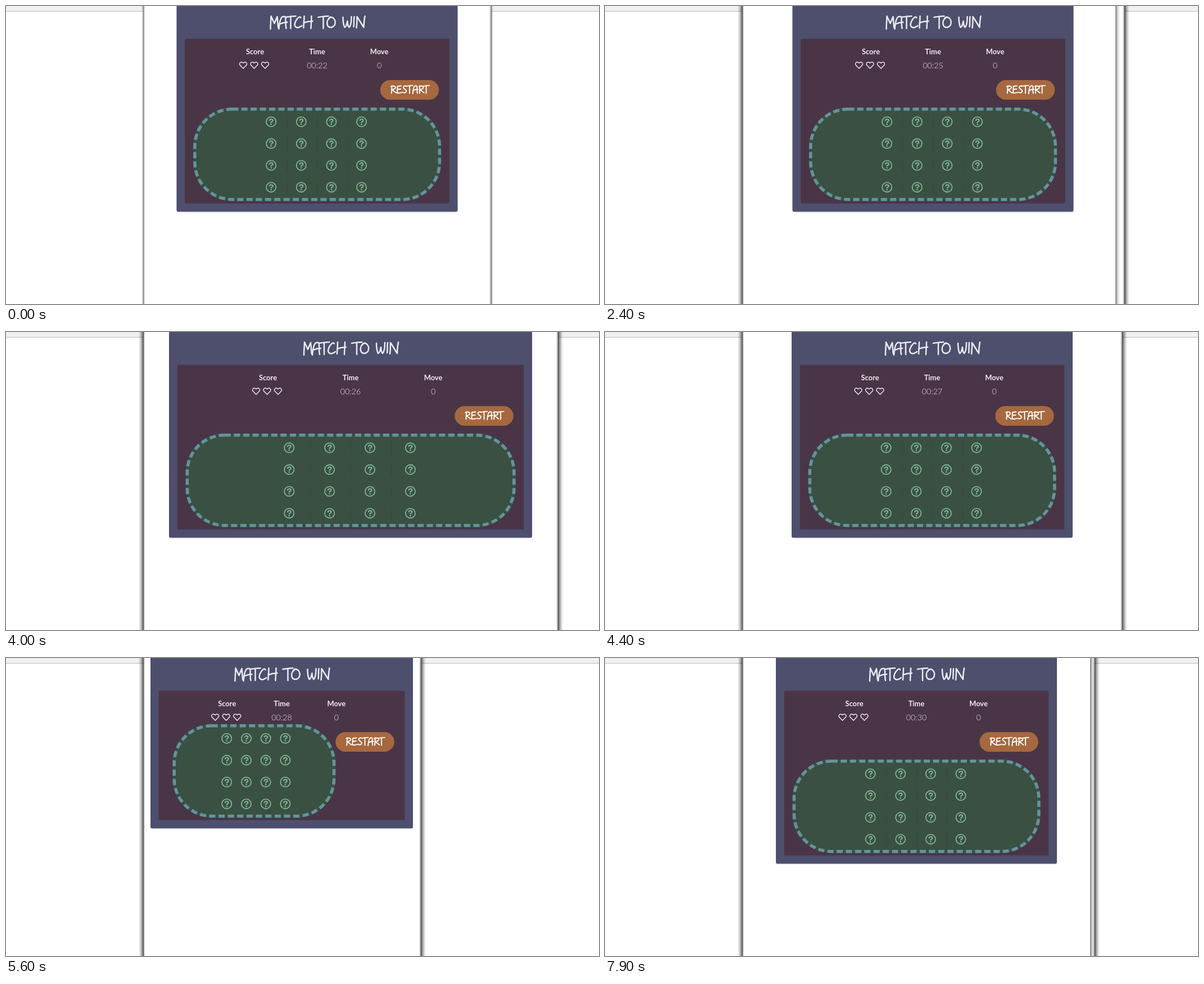
These frames come from a looping animation (1055 by 531 pixels, 8 s). An HTML page:

```html
<!DOCTYPE html>
<html lang="en">
<head>
<meta charset="utf-8">
<title>Match to win</title>
<style>
  html, body { margin: 0; width: 100%; height: 100%; overflow: hidden; background: #fff; }
  svg { display: block; width: 100vw; height: 100vh; }
  text { text-anchor: middle; font-family: Lato, sans-serif; fill: #f0eaf0; }
  .label { font-size: 12.9px; font-weight: 700; }
  .value { font-size: 14.2px; font-weight: 300; fill: #e9e0e8; }
  .ink { fill: none; stroke-linecap: round; stroke-linejoin: round; }
</style>
</head>
<body>
<svg viewBox="0 0 1055 531">
  <defs>
    <linearGradient id="shade">
      <stop offset="0" stop-opacity=".62"/>
      <stop offset=".35" stop-opacity=".34"/>
      <stop offset=".7" stop-opacity=".1"/>
      <stop offset="1" stop-opacity="0"/>
    </linearGradient>
    <path id="heart" class="ink" stroke="#f3edf3" stroke-width="1.4"
      d="M0 5.7L-5.6 0C-8.6-3.8-3.6-7.8 0-3.9C3.6-7.8 8.6-3.8 5.6 0Z"/>
    <g id="ask" class="ink" stroke="#7fb592">
      <circle r="8.6" stroke-width="1.8"/>
      <path stroke-width="2.1" d="M-2.8-2.3C-2.2-5.4 3.2-5 3-1.9C2.9 0-.1 0-.1 1.5"/>
      <circle cy="4.5" r=".5" stroke-width="1.7"/>
    </g>
  </defs>
  <path fill="#f0f0f0" d="M0 0H1055V9H0Z"/>
  <path fill="#bababa" d="M0 9H1055V10H0Z"/>
  <g id="scene"></g>
</svg>
<script>
const LOOP = 8000, LEFT = 246;

// time, right side of the page, outer frame edge, inner frame edge
const resizes = [
  [0, 861], [2100, 877], [2200, 892], [2300, 907], [2400, 921, 924, 909],
  [3000, 988], [3100, 1000], [3200, 1012], [3400, 1024], [3700, 1015], [3800, 1006],
  [4000, 980], [4100, 966, 963], [4300, 946], [4400, 918], [4600, 890],
  [4800, 860], [4900, 829], [5100, 794], [5300, 768], [5400, 743],
  [5600, 735, 738], [5700, 700], [5900, 668], [6100, 643], [6400, 638], [6500, 633],
  [7100, 672, 682, 675], [7500, 780, 787, 782], [7900, 862, 871, 864]
];
const ticks = [1300, 2100, 2400, 3400, 4400, 5400, 6400, 7500];

// Pen strokes of the hand-lettered capitals, 24 units tall
const strokes = {
  M: "M1 24C1 16 2 8 2 1L8 14L13 2C14 10 14 17 15 22",
  A: "M1 24C2 12 4 3 8 2C13 1 13 3 13 6C13 14 13 19 14 23M3 15C7 13 11 12 16 12",
  T: "M0 3C6 2 12 1 18 1M9 2C9 10 9 16 9 23",
  C: "M12 4C10 0 5 5 2 12C-1 20 5 25 14 18",
  H: "M2 1C2 9 1 16 1 22M15 1C15 9 14 16 14 23M1 13C6 11 11 10 17 10",
  O: "M8 3C-1 5-2 21 7 21C17 21 18 6 9 3C6 2 4 4 4 6",
  W: "M1 3C1 11 2 17 4 21C7 21 8 14 9 10C9 15 10 19 12 21C15 18 16 8 16 2",
  I: "M2 2C1 9 2 15 1 20",
  N: "M1 22C2 14 2 8 2 2C6 8 10 15 14 21C14 14 15 7 16 1",
  R: "M3 2C3 10 2 17 2 23M0 4C8 0 14 4 13 8C12 11 7 12 3 13C7 15 11 19 15 22",
  E: "M12 2C8 3 5 3 2 3C2 10 1 16 1 22C6 23 9 22 13 21M2 12C6 12 8 11 11 11",
  S: "M11 3C7 0 1 4 3 8C5 12 11 12 11 17C10 23 4 22 0 20"
};

const rect = (x, y, w, h, fill, r = 0) =>
  `<rect x="${x}" y="${y}" width="${w}" height="${h}" rx="${r}" fill="${fill}"/>`;
const text = (x, y, cls, s) => `<text x="${x}" y="${y}" class="${cls}">${s}</text>`;
const use = (id, x, y) => `<use href="#${id}" x="${x}" y="${y}"/>`;

function lettering(words, offsets, x, y, scale, attrs) {
  const glyphs = [...words.replaceAll(" ", "")]
    .map((c, i) => `<path transform="translate(${offsets[i]})" d="${strokes[c]}"/>`).join("");
  return `<g class="ink" role="img" aria-label="${words}" ${attrs}
    transform="translate(${x} ${y}) scale(${scale})">${glyphs}</g>`;
}

function shadow(x, dir, size, opacity) {
  return `<g transform="translate(${x}) scale(${dir} 1)" opacity="${opacity}">
    ${rect(0, 0, size, 531, "url(#shade)")}</g>`;
}

function frame(outer, edge, focus) {
  const size = 4 + 5 * focus, opacity = .5 + .5 * focus;
  const line = focus ? "#4c4c4c" : "#6e6e6e";
  let out = shadow(244.5, -1, size, opacity) + shadow(outer + .5, 1, size, opacity)
    + rect(244, 0, outer - 243, 531, "#fff")
    + rect(244, 0, 1.4, 531, line) + rect(245.4, 0, 1.6, 531, "#d0d0d0")
    + rect(outer - 2.4, 0, 2, 531, "#c9c9c9") + rect(outer - .4, 0, 1.4, 531, line);
  if (edge < outer)
    out += shadow(edge, 1, Math.min(8, outer - edge), .55) + rect(edge - .8, 0, 1.4, 531, "#777");
  return out;
}

function board(x, y, w, wide) {
  const h = 166.5, pen = 5.5, r = 66.5, dash = 2 * pen;
  const length = 2 * (w + h - 2 * pen) - 8 * r + 2 * Math.PI * r;
  const count = Math.round((length + pen) / (dash + pen));
  const gap = (length - count * dash) / (count - 1);
  let out = rect(x, y, w, h, "#3a5042", r + pen / 2)
    + `<rect x="${x + pen / 2}" y="${y + pen / 2}" width="${w - pen}" height="${h - pen}" rx="${r}"
        fill="none" stroke="#62949b" stroke-width="${pen}" stroke-dasharray="${dash} ${gap}"/>`;
  const cell = (w - 12) / 8, start = x + 6 + 2 * cell;
  for (let row = 0; row < 4; row++)
    for (let col = 0; col < 4; col++) {
      const cx = start + col * cell, cy = y + 25.2 + row * 38.9;
      out += use("ask", cx + Math.max(cell / 2 - 1.5, 20.8), cy);
      if (wide && col) out += rect(cx, cy - 12, 1, 24, "#344a3c");
    }
  return out;
}

function card(right, seconds) {
  const page = right - LEFT, mid = LEFT + page / 2;
  const wide = page >= 531, wrapped = right < 655;
  const w = page >= 686 ? 646 : wide ? 500 : page - 22;
  const x = mid - w / 2, drop = wrapped ? 10.7 : 0;
  const bottom = (wide ? 366.5 : 303.5) + drop;
  const step = (w - 29 - (wide ? 29 : 49)) / 4, button = x + w - 137.7;
  const score = mid - step;
  const hearts = wrapped ? [[-10.8, 0], [8.8, 0], [-1, 14.6]] : [[-21, 0], [-1.5, 0], [18, 0]];

  return rect(x, 1, w, bottom, "#d3d3df", 3) + rect(x, -4, w, bottom + 4, "#4d4f6d", 3)
    + rect(x + 14.7, 58.5, w - 29.4, bottom - 73.2, "#4a3547", 2)
    + lettering("MATCH TO WIN", [-84, -69, -56, -41, -25, 2, 17, 45, 64, 69],
        mid, 17, 1, 'stroke="#eceaf2" stroke-width="2.5"')
    + ["Score", "Time", "Move"].map((s, i) => text(mid + (i - 1) * step, 85.5, "label", s)).join("")
    + hearts.map(([dx, dy]) => use("heart", score + dx, 105.6 + dy)).join("")
    + text(mid, 110.5, "value", "00:" + seconds) + text(mid + step, 110.5, "value", 0)
    + (wide ? board(x + 29.6, 181, w - 59, true) : board(x + 39.5, 118 + drop, w - 177.2, false))
    + rect(button, 132 + drop, 104.5, 35, "#a6683f", 17.5)
    + lettering("RESTART", [-53, -36, -20, -9, 8, 26, 38],
        button + 52.2, 141 + drop, .63, 'stroke="#fff" stroke-width="3"');
}

const scene = document.getElementById("scene");
let shown = "";

function draw(now) {
  const t = now % LOOP;
  const [, right, outer = right + 2, edge = outer] = resizes.findLast(s => s[0] <= t);
  const seconds = 22 + ticks.filter(tick => tick <= t).length;
  const focus = t < 200 ? 0 : t < 300 ? .5 : 1;
  const state = [right, seconds, focus].join();
  if (state !== shown) {
    scene.innerHTML = frame(outer, edge, focus) + card(right, seconds);
    shown = state;
  }
  requestAnimationFrame(draw);
}
draw(performance.now());
</script>
</body>
</html>
```
